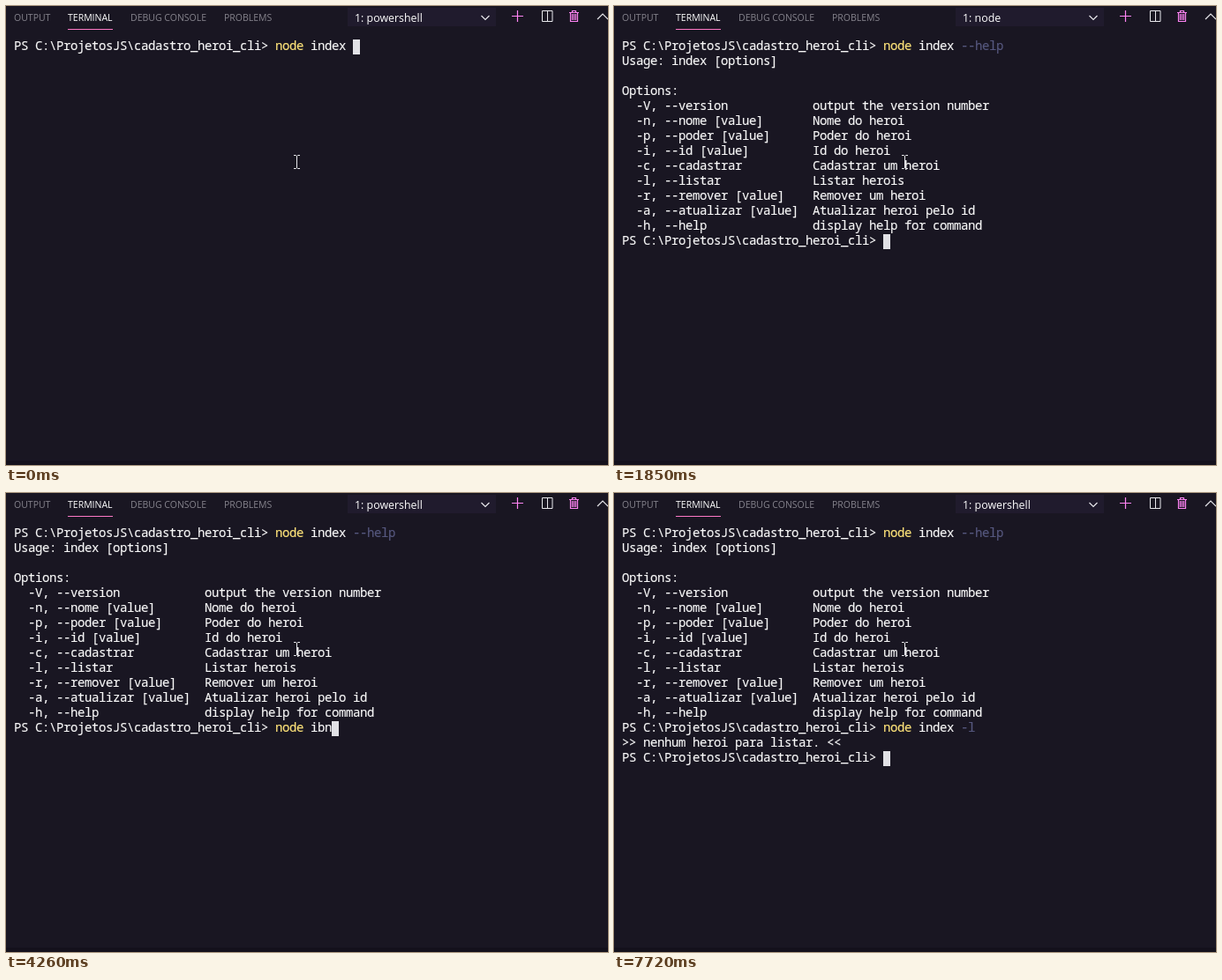
Recreate the animation shown at these times as an HTML page. Size 682 px wide and 521 px high, loop 8000 ms.

```html
<!DOCTYPE html>
<html lang="pt">
<head>
<meta charset="utf-8">
<title>Terminal</title>
<style>
  html, body { margin: 0; width: 100%; height: 100%; overflow: hidden; background: #191622; }
  svg { display: block; width: 682px; height: 521px; }
  text { white-space: pre; }
  .ui { font-family: "Open Sans", "Noto Sans", sans-serif; }
  .tabs { font-size: 10.5px; fill: #85838c; }
  .tabs .active { fill: #fff; }
  .shell { font-size: 12.4px; fill: #fff; }
  .term {
    font: 500 14px "Noto Sans Mono", "DejaVu Sans Mono", monospace;
    letter-spacing: -.4px;
    font-variant-ligatures: none;
    fill: #f8f8f8; stroke: #f8f8f8; stroke-width: .15px;
  }
  .cmd { fill: #ffe47a; stroke: #ffe47a; }
  .flag { fill: #56587f; stroke: #56587f; }
  .line { fill: none; stroke: #e8e8ec; }
  .pink { fill: none; stroke: #ff84f4; }
</style>
</head>
<body>
<svg viewBox="0 0 682 521">
  <rect width="682" height="521" fill="#191622"/>
  <rect y="516" width="682" height="5" fill="#14111c"/>

  <g class="ui tabs">
    <text x="9" y="17">OUTPUT</text>
    <text x="70" y="17" class="active">TERMINAL</text>
    <text x="141" y="17">DEBUG CONSOLE</text>
    <text x="247" y="17">PROBLEMS</text>
  </g>
  <rect x="70" y="26" width="51" height="1" fill="#ff79c6"/>

  <rect x="387" y="2" width="168" height="21" fill="#201b2d"/>
  <text id="shell" class="ui shell" x="395" y="18"></text>
  <path class="line" d="M538.5 11l4.5 4.5 4.5-4.5" stroke-width="1.2"/>

  <path class="pink" d="M573 11.5h13M579.5 5v13" stroke-width="1.2"/>
  <path class="line" d="M607.5 5.5h11.5v12h-11.5zM613.5 5.5v12"/>
  <path class="pink" d="M638 7.5h11M641.5 7v-1.5h4v1.5M639.5 8v9.5h8v-9.5M641.5 9v7M643.5 9v7M645.5 9v7" stroke-width="1.2"/>
  <path class="line" d="M670 15l6-6 6 6" stroke-width="1.2"/>

  <g id="term" class="term"></g>
  <rect id="cursor" width="8" height="17" fill="#e1e1e6"/>

  <path class="line" d="M326 169.5h2.5l1 1 1-1h2.5M329.5 170v14M326 184.5h2.5l1-1 1 1h2.5"/>
</svg>
<script>
const LOOP = 8000, LEFT = 9, TOP = 38, COL = 8, ROW = 17;
const PROMPT = 'PS C:\\ProjetosJS\\cadastro_heroi_cli> ';

const option = (flags, text) => '  ' + flags.padEnd(25) + text;
const HELP = [
  'Usage: index [options]',
  '',
  'Options:',
  option('-V, --version', 'output the version number'),
  option('-n, --nome [value]', 'Nome do heroi'),
  option('-p, --poder [value]', 'Poder do heroi'),
  option('-i, --id [value]', 'Id do heroi'),
  option('-c, --cadastrar', 'Cadastrar um heroi'),
  option('-l, --listar', 'Listar herois'),
  option('-r, --remover [value]', 'Remover um heroi'),
  option('-a, --atualizar [value]', 'Atualizar heroi pelo id'),
  option('-h, --help', 'display help for command')
];

// Each command: typed states, Enter, output, and when the shell title returns.
const COMMANDS = [
  {
    typing: [
      [0, 'node index '], [120, 'node index -'], [280, 'node index --'],
      [680, 'node index --h'], [830, 'node index --hel'], [980, 'node index --help']
    ],
    enter: 1730, output: 1850, done: 1970, lines: HELP
  },
  {
    typing: [
      [1850, ''], [2690, 'n'], [2840, 'nod'], [3130, 'node '],
      [3280, 'node ib'], [3400, 'node ibnd'], [3550, 'node ibnde'], [3700, 'node ibndex'],
      [4100, 'node ibnd'], [4260, 'node ibn'], [4410, 'node ib'], [4660, 'node i'],
      [4970, 'node ind'], [5550, 'node inde'], [5830, 'node index'], [6740, 'node index '],
      [7020, 'node index -'], [7170, 'node index -l']
    ],
    enter: 7450, output: 7600, done: 7720, lines: ['>> nenhum heroi para listar. <<']
  },
  { typing: [[7600, '']], enter: Infinity, output: Infinity, done: Infinity, lines: [] }
];

const term = document.getElementById('term');
const cursor = document.getElementById('cursor');
const shell = document.getElementById('shell');

function span(text, style) {
  return `<tspan class="${style}">${text.replace(/</g, '&lt;').replace(/>/g, '&gt;')}</tspan>`;
}

function commandLine(typed) {
  const [, cmd, args, flag] = typed.match(/^(\w*)([^-]*)(.*)$/);
  return span(PROMPT, '') + span(cmd, 'cmd') + span(args, '') + span(flag, 'flag');
}

function screenAt(t) {
  const rows = [];
  let col = 0, title = '1: powershell';
  for (const { typing, enter, output, done, lines } of COMMANDS) {
    if (t < typing[0][0]) break;
    const typed = typing.filter(([time]) => time <= t).pop()[1];
    rows.push(commandLine(typed));
    col = PROMPT.length + typed.length;
    if (t >= enter && t < output) {
      rows.push('');
      col = 0;
    }
    if (t >= output) rows.push(...lines.map(line => span(line, '')));
    if (t >= output && t < done) title = '1: node';
  }
  return { rows, col, title };
}

let shown = '';
function draw(now) {
  const { rows, col, title } = screenAt(now % LOOP);
  const markup = rows.map((row, i) =>
    `<text x="${LEFT}" y="${TOP + 12 + i * ROW}">${row}</text>`).join('');
  if (markup !== shown) term.innerHTML = shown = markup;
  cursor.setAttribute('x', LEFT + col * COL);
  cursor.setAttribute('y', TOP + (rows.length - 1) * ROW);
  shell.textContent = title;
}

const start = performance.now();
function tick() {
  draw(performance.now() - start);
  requestAnimationFrame(tick);
}
tick();
</script>
</body>
</html>
```
